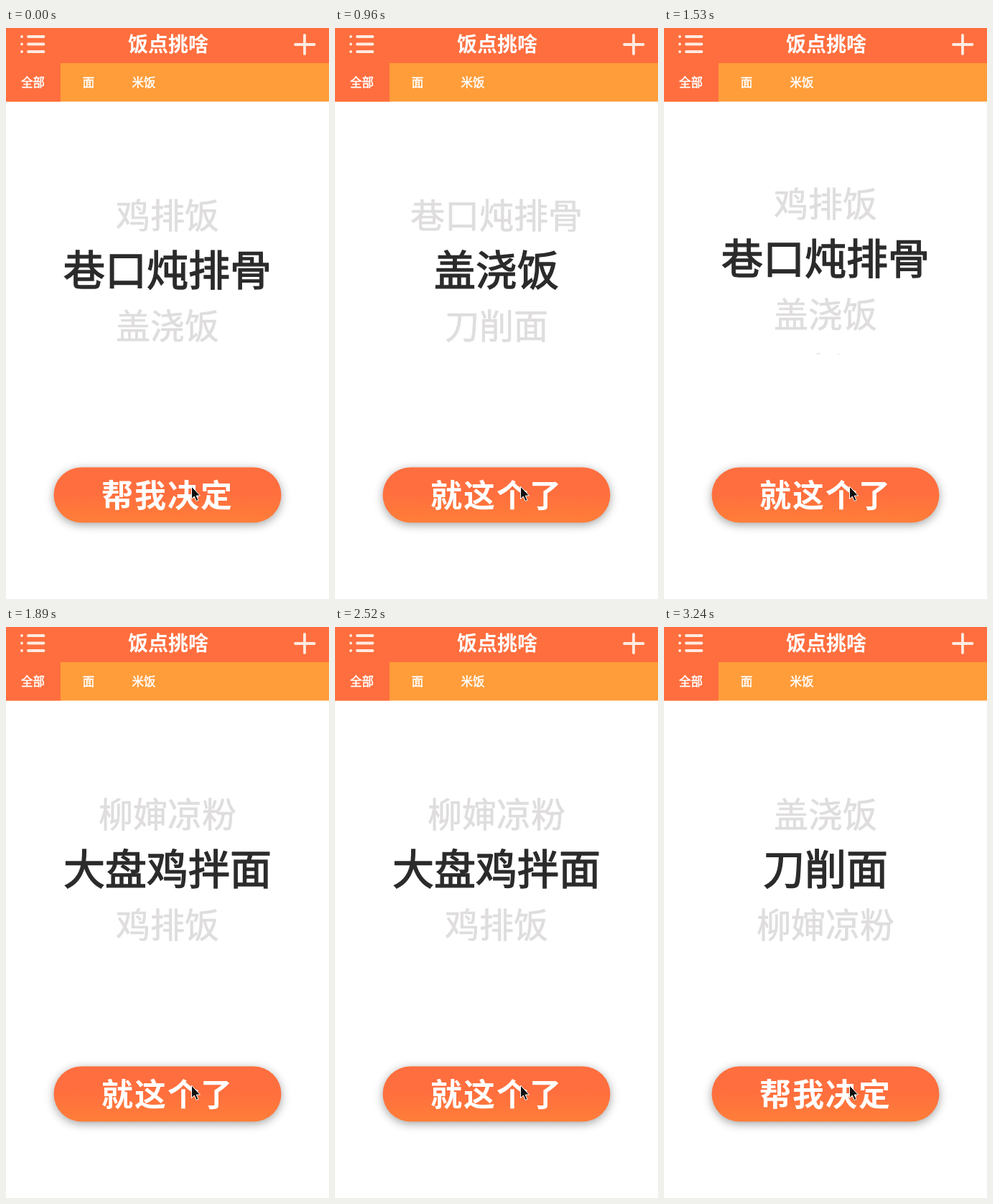
Write an HTML page that moves like this. It is 450 px wide and 796 px high and loops after 3.27 s.

```html
<!DOCTYPE html>
<html lang="zh-CN">
<head>
<meta charset="utf-8">
<title>饭点挑啥</title>
<style>
  html, body { margin: 0; width: 100%; height: 100%; overflow: hidden; background: #fff; }
  svg { display: block; width: 100%; height: 100%; }
  text {
    font-family: "Noto Sans CJK SC", "Noto Sans CJK", "Noto Sans SC", sans-serif;
    text-anchor: middle;
    fill: #fff;
  }
  .title { font-size: 28px; font-weight: 700; }
  .tab { font-size: 16.5px; stroke: #fff; stroke-width: .5px; }
  .label { font-size: 44px; font-weight: 700; letter-spacing: 2px; }
  .item { font-size: 48px; fill: #dfdddd; stroke: #dfdddd; stroke-width: .7px; }
  .item.active { font-size: 58px; fill: #2b2b2b; stroke: #2b2b2b; stroke-width: 1.4px; }
  .button { filter: drop-shadow(0 3px 6.5px rgba(0, 0, 0, .36)); }
  .icon { fill: none; stroke: #ffebe2; stroke-width: 3.8; stroke-linecap: round; }
</style>
</head>
<body>
<svg viewBox="0 0 450 796">
  <defs>
    <linearGradient id="fill" x1="0" y1="0" x2="0" y2="1">
      <stop offset=".45" stop-color="#ff6e3e"/>
      <stop offset="1" stop-color="#ff7e39"/>
    </linearGradient>
    <clipPath id="window"><rect y="222" width="450" height="232.5"/></clipPath>
  </defs>

  <rect width="450" height="102.600" fill="#ff9d3a"/>
  <rect width="450" height="49" fill="#ff6e3e"/>
  <rect y="49" width="76" height="53.600" fill="#ff6e3e"/>
  <path class="icon" d="M22 12h.01M31 12H52.500M22 22.500h.01M31 22.500H52.500M22 33h.01M31 33H52.500"/>
  <path class="icon" d="M403 23H429.500M416 10V36"/>
  <text class="title" x="226" y="33">饭点挑啥</text>
  <text class="tab" x="37.500" y="82">全部</text>
  <text class="tab" x="115" y="82">面</text>
  <text class="tab" x="192" y="82">米饭</text>

  <g clip-path="url(#window)" id="list"></g>

  <rect class="button" x="66.500" y="612.600" width="317" height="76.800" rx="38.400" fill="url(#fill)"/>
  <text class="label" id="label" x="225" y="667.500"></text>
  <path d="M258.500 639V656.500L262.300 653L265.300 659.500L268 658.200L265.200 652H270.500Z"
        fill="#111" stroke="#fff" stroke-width="1"/>
</svg>
<script>
const LOOP = 3270, STEP = 30;
const PRESS = 235, PERIOD = 103, TURNS = 26;  // spin start, time per dish, dishes passed
const REST = 0.46;                            // share of each period spent still
const SLOT = 77, MIDDLE = 337.4;
const dishes = ["巷口炖排骨", "盖浇饭", "刀削面", "柳婶凉粉", "大盘鸡拌面", "鸡排饭"];

const list = document.getElementById("list");
const label = document.getElementById("label");
const rows = [-1, 0, 1, 2].map(offset => {
  const node = document.createElementNS("http://www.w3.org/2000/svg", "text");
  node.setAttribute("class", offset ? "item" : "item active");
  node.setAttribute("x", 225);
  list.append(node);
  return { node, offset, size: offset ? 48 : 58 };
});

function draw(time) {
  const t = Math.floor((time % LOOP + 1) / STEP) * STEP % LOOP;
  const turn = Math.min(TURNS, Math.max(0, (t - PRESS) / PERIOD));
  const index = Math.floor(turn);
  const shift = Math.max(0, (turn - index - REST) / (1 - REST));
  for (const { node, offset, size } of rows) {
    node.textContent = dishes[(index + offset + dishes.length) % dishes.length];
    node.setAttribute("y", MIDDLE + (offset - shift) * SLOT + size * 0.38);
  }
  const spinning = t >= PRESS && turn < TURNS;
  label.textContent = spinning ? "就这个了" : "帮我决定";
}

const start = performance.now();
function tick() {
  draw(performance.now() - start);
  requestAnimationFrame(tick);
}
tick();
</script>
</body>
</html>
```
